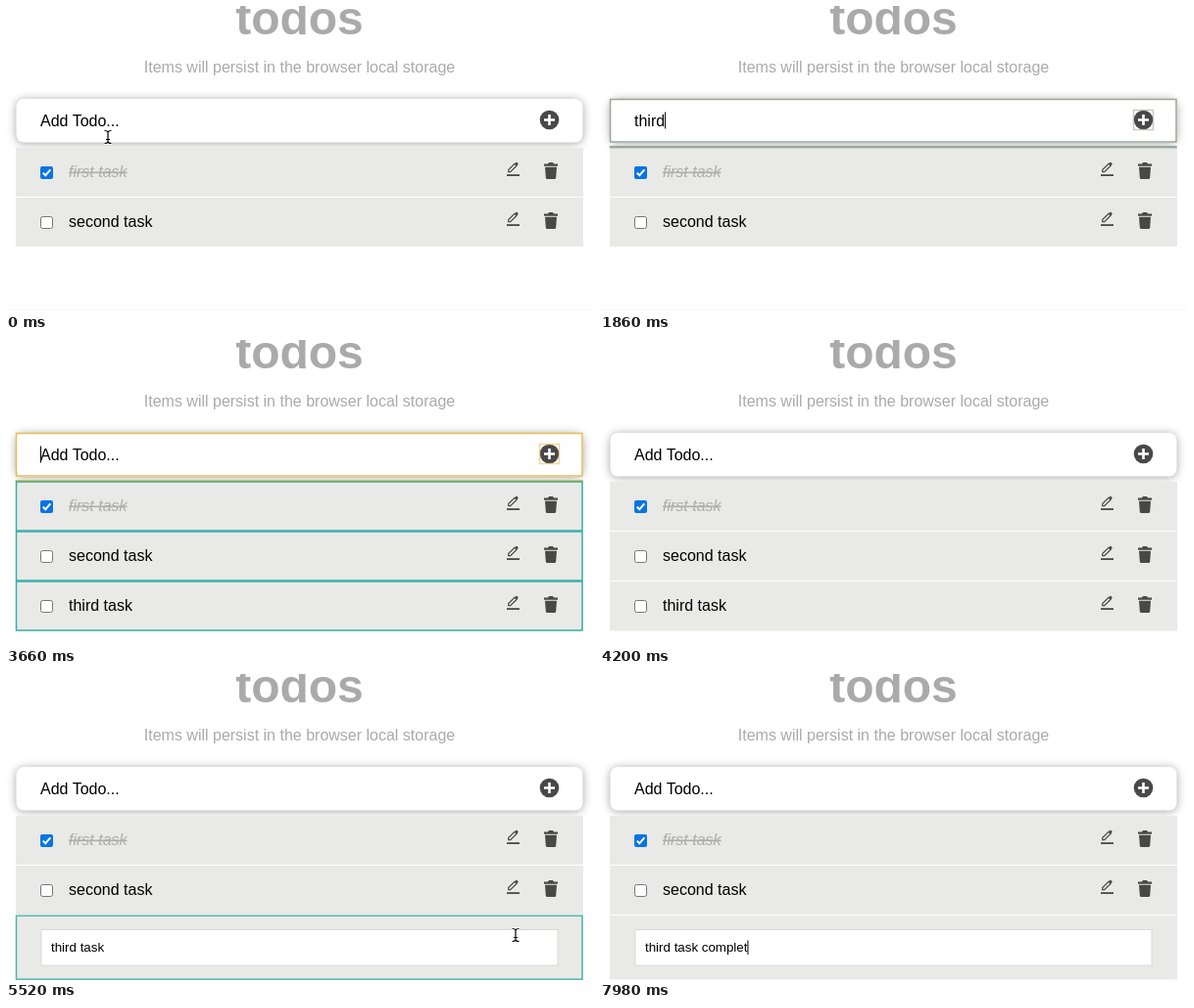
Recreate the animation shown at these times as an HTML page. Size 600 by 313 pixels, loop 8 s.

```html
<!DOCTYPE html>
<html lang="en">
<head>
<meta charset="utf-8">
<title>todos</title>
<style>
  html, body { margin: 0; width: 100%; height: 100%; overflow: hidden; background: #fff; }
  svg { display: block; width: 600px; height: 313px; }
  text { font: 16px "Liberation Sans", Arial, sans-serif; white-space: pre; }
  .muted { fill: #aaa; text-anchor: middle; }
  .title { font-size: 48px; font-weight: bold; }
  .done { fill: #adadab; font-style: italic; text-decoration: line-through; }
  .small { font-size: 13.333px; }
  .form { fill: #fff; filter: drop-shadow(0 1px 5px rgba(0, 0, 0, .36)); }
  .row { fill: #e9e9e7; }
  .caret { fill: #000; }
  .flash rect { fill: none; stroke: currentColor; stroke-width: 1.5; }
  .flash .glow { stroke: #fff; stroke-width: 4; opacity: .65; }
</style>
</head>
<body>
<svg viewBox="0 0 600 313">
  <defs>
    <g id="box"><rect x="35.5" y="19.5" width="12" height="12" rx="2" fill="#fff" stroke="#767676"/></g>
    <g id="checked">
      <rect x="35" y="19" width="13" height="13" rx="2" fill="#0874e4"/>
      <path d="M37.7 25.6l2.6 2.7 5-6" fill="none" stroke="#fff" stroke-width="2"/>
    </g>
    <g id="tools" fill="#484848">
      <path d="M511 27.2h13v1.8h-13z"/>
      <path d="M512.7 24.6v-2l6.3-6.2 2 2-6.3 6.2z" fill="none" stroke="#484848" stroke-width="1.2"/>
      <path d="M519 16.2l1.4-1.2q.6-.4 1.1 0l1 1q.4.6 0 1.100l-1.300 1.300z"/>
      <path d="M549 16.500h4l1-1.500h4l1 1.500h4v2.300h-14z"/>
      <path d="M550 19.800h12l-.8 10.700q-.1 1.500-1.500 1.500h-7.400q-1.400 0-1.500-1.500z"/>
    </g>
    <g id="ibeam" fill="none">
      <path id="stem" d="M-3.500-6.500q3 0 3.500 1.500q.5-1.500 3.500-1.500M0-5v10M-3.500 6.500q3 0 3.500-1.500q.5 1.500 3.500 1.500M-2 2.500h4" stroke="#fff" stroke-width="3"/>
      <use href="#stem"/>
      <path d="M-3.500-6.500q3 0 3.500 1.500q.5-1.500 3.500-1.500M0-5v10M-3.500 6.500q3 0 3.500-1.500q.5 1.500 3.500 1.500M-2 2.500h4" stroke="#000" stroke-width="1.200"/>
    </g>
    <path id="arrow" d="M0 0v14l3.300-3 2.200 5 2.200-1-2.200-4.800h4.500z" stroke="#fff"/>
  </defs>

  <text class="muted title" x="299.500" y="29">todos</text>
  <text class="muted" x="299.500" y="68">Items will persist in the browser local storage</text>
  <rect id="pageEnd" y="310" width="600" height="1" fill="#f7f7f7"/>

  <rect class="form" x="10.500" y="95" width="578" height="44.500" rx="8"/>
  <text id="entry" x="35" y="122.500"></text>
  <rect id="entryCaret" class="caret" y="108.500" width="1" height="17"/>
  <circle cx="554.500" cy="116.500" r="9.800" fill="#484848"/>
  <path d="M549 116.500h11M554.500 111v11" stroke="#fff" stroke-width="2.600"/>

  <g transform="translate(0 145)">
    <rect class="row" x="10" width="579" height="50"/>
    <use href="#checked"/><use href="#tools"/>
    <text class="done" x="64" y="30">first task</text>
  </g>
  <g transform="translate(0 196)">
    <rect class="row" x="10" width="579" height="50"/>
    <use href="#box"/><use href="#tools"/>
    <text x="64" y="30">second task</text>
  </g>
  <g id="third" transform="translate(0 247)">
    <rect class="row" x="10" width="579" height="50.500"/>
    <use href="#box"/><use href="#tools"/>
    <text x="64" y="30">third task</text>
  </g>
  <g id="editor">
    <rect class="row" x="10" y="247" width="579" height="65.500"/>
    <rect x="36" y="261.500" width="527" height="36.500" fill="#fff" stroke="#dadad8"/>
    <text id="edit" class="small" x="46" y="284"></text>
    <rect id="editCaret" class="caret" y="272.500" width="1" height="14.500"/>
  </g>

  <g id="formFlash" class="flash">
    <rect class="glow" x="12" y="97" width="575" height="41"/>
    <rect x="10.500" y="95.500" width="577.500" height="43.500"/>
    <rect x="544.500" y="106.500" width="20" height="20" opacity=".6"/>
    <rect x="10.500" y="143.700" width="577.500" height="1"/>
  </g>
  <g id="rowsFlash" class="flash" color="#37afa9">
    <rect x="10.500" y="145" width="577.500" height="50"/>
    <rect x="10.500" y="196" width="577.500" height="50"/>
    <rect x="10.500" y="247" width="577.500" height="50"/>
  </g>
  <g id="editFlash" class="flash" color="#4fb5ac">
    <rect x="10.500" y="247.300" width="577.500" height="65"/>
  </g>
  <use id="cursor"/>
</svg>
<script>
const LOOP = 8000, FLASH = 250, BLINK = 500;
const FOCUS = 300, ENTER = 3480, EDIT = 5460, EDIT_FOCUS = 6380;
const entryKeys = [880, 1400, 1520, 1650, 1800, 2220, 2330, 2450, 2570, 2700];
const editKeys = [6850, 7010, 7150, 7290, 7430, 7580, 7740, 7900];
// Highlight colour warms up with every re-render inside one burst.
const heat = ['#5bb5ae', '#7ab0a2', '#8aab9d', '#9ba69c', '#abb07d',
  '#beb57a', '#cbb873', '#d4ba6c', '#dcbd68', '#e6bd58'];
// Pointer stops: time, x, y
const path = [[0, 104, 134], [40, 104, 134], [330, 117, 108], [4300, 117, 108],
  [5160, 520, 267], [5600, 520, 267], [6300, 215, 285], [LOOP, 215, 285]];

const $ = id => document.getElementById(id);
const show = (id, on) => $(id).setAttribute('display', on ? 'inline' : 'none');
const typed = (keys, t) => keys.filter(k => k <= t).length;
const setText = (id, s) => { if ($(id).textContent !== s) $(id).textContent = s; };

function caret(id, textId, empty, since, keys, t) {
  const last = Math.max(since, ...keys.filter(k => k <= t));
  show(id, t >= last && (t - last) % (2 * BLINK) < BLINK);
  const field = $(textId);
  const width = empty ? 0 : field.getComputedTextLength();
  $(id).setAttribute('x', +field.getAttribute('x') + width);
}

function formHeat(t) {
  let count = 0, expires = 0;
  for (const k of [...entryKeys, ENTER]) {
    if (k > t) break;
    const live = k < expires;
    count = live ? count + 1 : 1;
    expires = (live ? expires : k) + FLASH;
  }
  return t < expires ? count : 0;
}

function pointer(t) {
  const i = path.findIndex(p => p[0] > t);
  const [t0, x0, y0] = path[i - 1], [t1, x1, y1] = path[i];
  const u = (t - t0) / (t1 - t0), e = u * u * (3 - 2 * u);
  return [x0 + (x1 - x0) * e, y0 + (y1 - y0) * e];
}

function render(t) {
  const n = t < ENTER ? typed(entryKeys, t) : 0;
  setText('entry', n ? 'third task'.slice(0, n) : 'Add Todo...');
  caret('entryCaret', 'entry', !n, FOCUS, [...entryKeys, ENTER], t);
  if (t >= EDIT) show('entryCaret', false);

  show('pageEnd', t < ENTER);
  show('third', t >= ENTER && t < EDIT);
  show('editor', t >= EDIT);
  setText('edit', 'third task' + ' complet'.slice(0, typed(editKeys, t)));
  caret('editCaret', 'edit', false, EDIT_FOCUS, editKeys, t);

  const count = formHeat(t);
  show('formFlash', count);
  if (count) $('formFlash').setAttribute('color', heat[Math.min(count, 10) - 1]);
  show('rowsFlash', t >= ENTER && t < ENTER + FLASH);
  show('editFlash', t >= EDIT && t < EDIT + FLASH);

  const [x, y] = pointer(t);
  const overText = y < 140 || t >= EDIT;
  show('cursor', t < entryKeys[0] || (t > 4300 && t < editKeys[0]));
  $('cursor').setAttribute('href', overText ? '#ibeam' : '#arrow');
  $('cursor').setAttribute('transform', `translate(${x} ${y})`);
}

const start = performance.now();
function frame() {
  render((performance.now() - start) % LOOP);
  requestAnimationFrame(frame);
}
frame();
</script>
</body>
</html>
```
